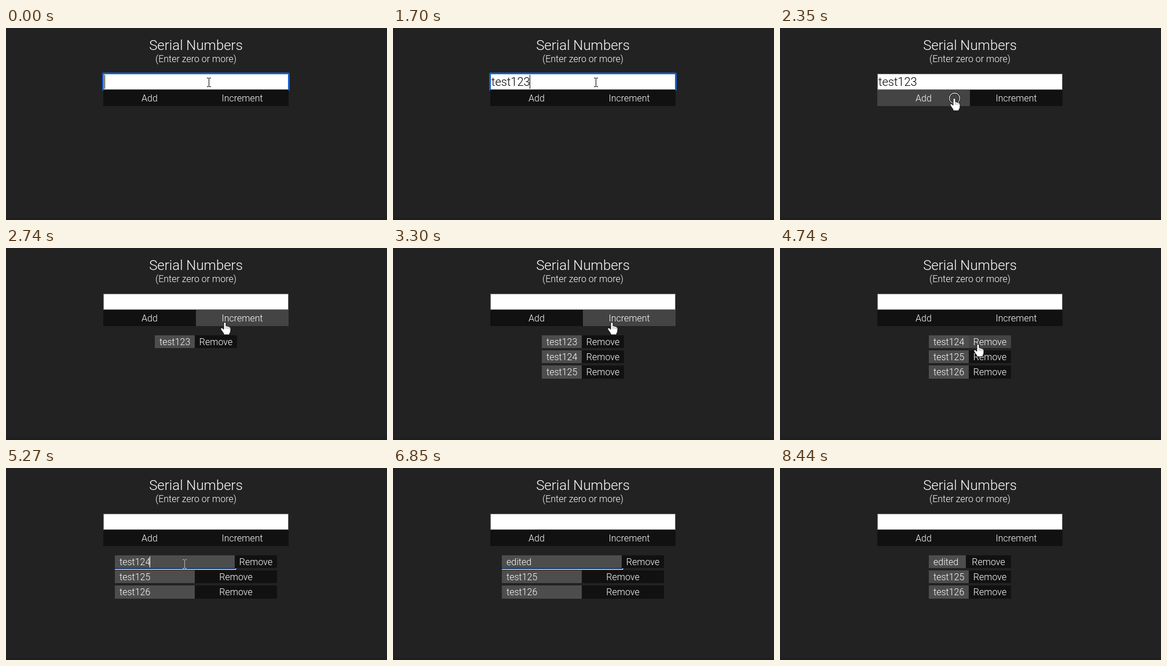
Recreate the animation shown at these times as an HTML page with a canvas. Size 658 px wide and 332 px high, loop 9100 ms.

```html
<!DOCTYPE html>
<html lang="en">
<head>
<meta charset="utf-8">
<title>Serial Numbers</title>
<style>
  html, body { margin: 0; width: 100%; height: 100%; overflow: hidden; background: #222; }
  canvas { display: block; }
</style>
</head>
<body>
<canvas id="stage" width="658" height="332"></canvas>
<script>
const ctx = document.getElementById('stage').getContext('2d');
const LOOP = 9100;

// Pointer states: start time, kind, x, y, pressed
const pointer = [
  [0, 'beam', 350, 94],
  [130, 'none'],
  [1700, 'beam', 350, 94],
  [1830, 'beam', 345, 97],
  [1960, 'beam', 329, 104],
  [2090, 'hand', 312, 115],
  [2220, 'hand', 301, 121],
  [2350, 'hand', 301, 121, true],
  [2480, 'hand', 301, 121],
  [2610, 'hand', 320, 123],
  [2740, 'hand', 378, 128],
  [3020, 'hand', 378, 128, true],
  [3150, 'hand', 378, 128],
  [3830, 'arrow', 374, 141],
  [3960, 'hand', 370, 156],
  [4090, 'hand', 368, 160],
  [4220, 'hand', 367, 165, true],
  [4480, 'hand', 367, 165],
  [4740, 'hand', 342, 166],
  [4870, 'beam', 308, 166],
  [6200, 'none'],
  [8310, 'arrow', 336, 156],
  [8440, 'none']
];

const handShape = new Path2D('M-2 1.5Q0-1 2 1.5V7Q4 5.8 5 7.6Q7 6.8 8 8.8Q10 8.4 10 10.5V15' +
  'Q10 18 8 20V22H-2V20Q-4 17 -6.5 13.5Q-8 11 -6 10Q-4.5 9.6 -2 12.5Z');
const arrowShape = new Path2D('M.5.5V16L4 12.7L6.3 17.7L8.7 16.7L6.5 11.7H11.5Z');

const within = (t, spans) => spans.some(([from, to]) => t >= from && t < to);

function box(x, y, w, h, color) {
  ctx.fillStyle = color;
  ctx.fillRect(x, y, w, h);
}

function text(str, x, y, size = 16, align = 'center', color = '#fff') {
  ctx.font = `300 ${size}px Roboto, sans-serif`;
  ctx.textAlign = align;
  ctx.fillStyle = color;
  ctx.fillText(str, x, y);
  return ctx.measureText(str).width;
}

function button(label, x, y, w, h, baseline, [, kind, px, py]) {
  const hover = kind === 'hand' && px >= x && px < x + w && py >= y && py < y + h;
  box(x, y, w, h, hover ? '#444' : '#111');
  text(label, x + w / 2, baseline);
}

function drawInput(t) {
  const focused = t < 2350;
  if (focused) {
    ctx.fillStyle = '#1760cf';
    ctx.beginPath();
    ctx.roundRect(166, 77, 324, 32, 3);
    ctx.fill();
  } else {
    box(168, 79, 320, 28, '#767676');
  }
  box(169, 80, 318, 26, '#fff');
  const length = t >= 2480 ? 0 : t >= 910 ? 7 : Math.min(4, Math.floor(t / 130));
  const width = text('test123'.slice(0, length), 170, 100, 20, 'left', '#000');
  if (within(t, [[0, 130], [650, 1170], [1700, 2220]])) {
    box(Math.floor(170 + width), 81, 1, 24, '#000');
  }
}

function drawRows(t, cursor) {
  const editing = within(t, [[5270, 7380]]);
  const letters = t < 6200 ? 0 : Math.min(6, Math.floor((t - 6200) / 130) + 1);
  const count = t >= 4480 ? 3 : [2480, 3150, 3300, 3560].filter(start => t >= start).length;
  const first = t >= 4480 ? 124 : 123;
  const left = editing ? 188 : 257;
  const right = editing ? 468 : 399;

  for (let i = 0; i < count; i++) {
    const top = Math.round(151 + 26.2 * i);
    const height = Math.round(173.2 + 26.2 * i) - top;
    const baseline = Math.round(168 + 26.2 * i);
    const active = editing && i === 0;
    const label = i === 0 && letters ? 'edited'.slice(0, letters) : 'test' + (first + i);
    const split = active ? 395 : i === 0 && t >= 7380 ? 321 : 326;

    box(left, top, split - left, height, '#4d4d4d');
    button('Remove', split, top, right - split, height, baseline, cursor);
    const width = text(label, left + 8, baseline, 16, 'left');
    if (!active) continue;
    box(188, 174, 208, 1, '#1f6fdc');
    box(188, 175, 209, 1, '#e4efff');
    box(396, 174, 2, 1, '#e4efff');
    if (within(t, [[5270, 5800], [6330, 6850]])) {
      box(Math.floor(left + 8 + width - 0.5), 153, 1, 19, '#fff');
    }
  }
}

function drawPointer([, kind, x, y, pressed], t) {
  if (kind === 'none') return;
  if (kind === 'beam') {
    const color = t < 2400 ? '#000' : '#b5b5b5';
    box(x, y - 7, 1, 14, color);
    for (const edge of [y - 8, y + 7]) {
      box(x - 3, edge, 3, 1, color);
      box(x + 1, edge, 3, 1, color);
    }
    return;
  }
  if (pressed) {
    ctx.beginPath();
    ctx.arc(x + 0.5, y + 0.5, 9, 0, 2 * Math.PI);
    ctx.lineWidth = 3;
    ctx.strokeStyle = '#111';
    ctx.stroke();
    ctx.lineWidth = 1.3;
    ctx.strokeStyle = '#eee';
    ctx.stroke();
  }
  ctx.save();
  ctx.translate(x, y);
  const shape = kind === 'hand' ? handShape : arrowShape;
  ctx.fillStyle = '#fff';
  ctx.fill(shape);
  ctx.lineWidth = 1;
  ctx.strokeStyle = '#111';
  ctx.stroke(shape);
  if (kind === 'hand') {
    for (const gap of [2, 5, 8]) box(gap - 0.3, 8, 0.6, 4, '#555');
  }
  ctx.restore();
}

function draw(now) {
  const t = now % LOOP;
  const cursor = pointer.findLast(([start]) => t >= start);
  box(0, 0, 658, 332, '#222');
  box(0, 328, 658, 4, '#1f1f1f');
  text('Serial Numbers', 328, 38, 24);
  text('(Enter zero or more)', 328, 59);
  drawInput(t);
  button('Add', 168, 107, 160, 28, 127, cursor);
  button('Increment', 328, 107, 160, 28, 127, cursor);
  drawRows(t, cursor);
  drawPointer(cursor, t);
}

const begin = performance.now();
function tick() {
  draw(performance.now() - begin);
  requestAnimationFrame(tick);
}
tick();
</script>
</body>
</html>
```
